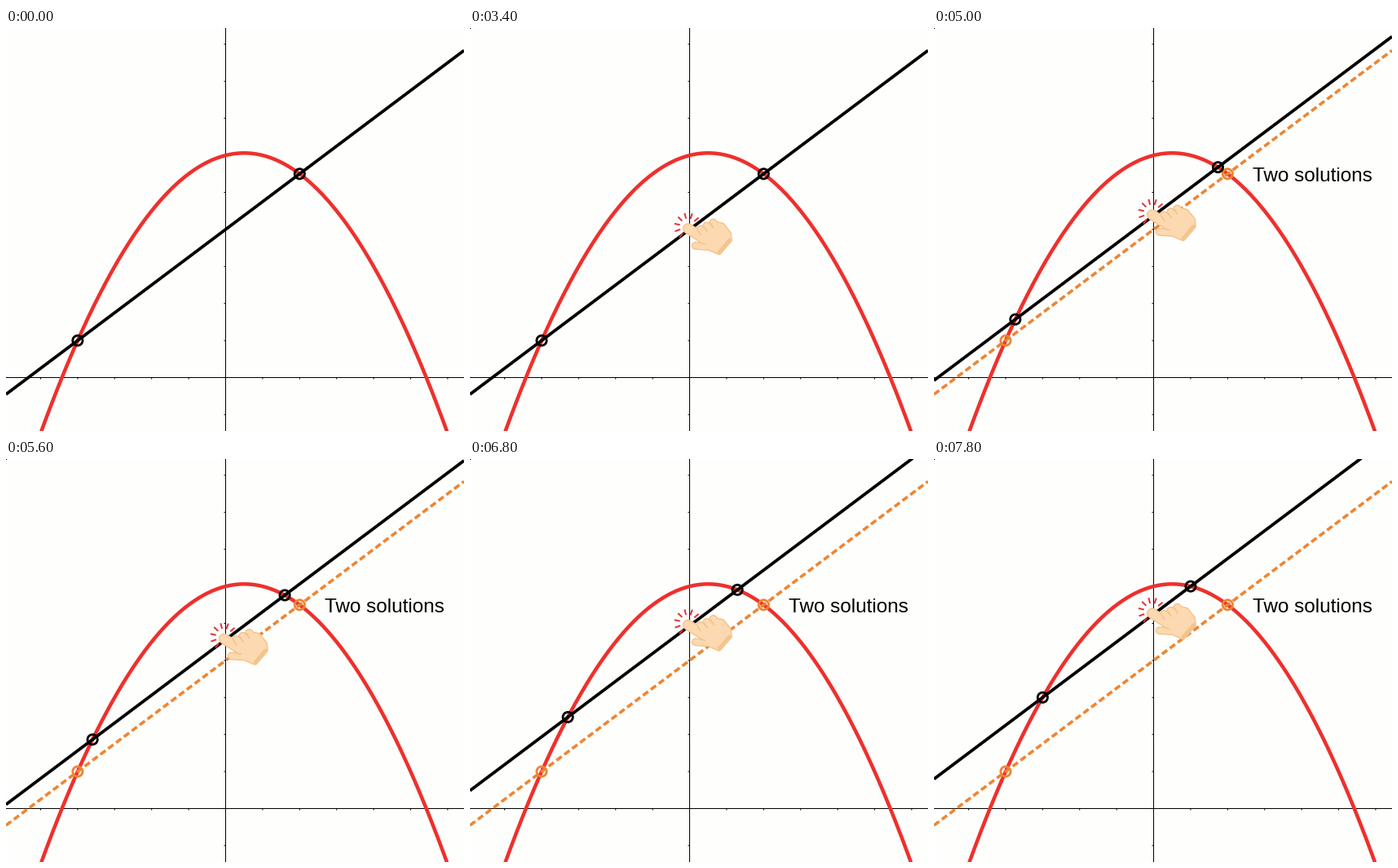
A matplotlib script that plays this animation: 562x494 px, repeating every 8 s.

```python
import math

import numpy as np
import matplotlib.pyplot as plt
from matplotlib.animation import FuncAnimation
from matplotlib.patches import Circle
from matplotlib.transforms import Affine2D

W, H, DPI = 562, 494, 64
PX = 72 / DPI               # points per pixel
STEP, FRAMES = 200, 40      # ms per frame, frames per loop
OX, OY, UNIT = 269.5, 428.5, 45.4
SLOPE, START = 0.75, 4.0

BLACK, RED, ORANGE = "#000000", "#ee302c", "#ee8532"
SKIN, SKIN_EDGE, SPARK = "#fcd9b0", "#f3c48c", "#e0353a"

fig = plt.figure(figsize=(W / DPI, H / DPI), dpi=DPI, facecolor="#fefefd")
ax = fig.add_axes([0, 0, 1, 1])
ax.set_xlim(0, W)
ax.set_ylim(H, 0)
ax.axis("off")


def to_px(x, y):
    return OX + UNIT * np.asarray(x), OY - UNIT * np.asarray(y)


def parabola(x):
    return 6 + 0.25 * x - 0.25 * x * x


def line_points(c):
    """The straight line from the left to the right edge of the stage."""
    x = (np.array([0, W]) - OX) / UNIT
    return to_px(x, SLOPE * x + c)


def crossings(c):
    root = math.sqrt(1 + 4 * (6 - c))
    return [to_px(x, parabola(x)) for x in (-1 - root, -1 + root)]


def stroke(x, y, color, width, z, cap="butt", **kw):
    return ax.plot(x, y, color=color, lw=width * PX, zorder=z, snap=False,
                   solid_capstyle=cap, **kw)[0]


def ring(color, z, center=(0, 0)):
    patch = Circle(center, 6.1, fill=False, ec=color, lw=2.8 * PX, zorder=z)
    return ax.add_patch(patch)


# Coordinate axes with ticks on the left and below
stroke([OX, OX], [0, H], BLACK, 1, 1)
stroke([0, W], [OY, OY], BLACK, 1, 1)
for k in range(-5, 10):
    x, y = to_px(k, k)
    stroke([x, x], [OY, OY + 2], BLACK, 1, 1)
    stroke([OX - 2, OX], [y, y], BLACK, 1, 1)

xs = np.linspace(-5.5, 6.5, 300)
stroke(*to_px(xs, parabola(xs)), RED, 4.5, 2)

# Starting position of the line, left behind as a trace
trace = [stroke(*line_points(START), ORANGE, 3.6, 3, dashes=(2.2, 1.15))]
trace += [ring(ORANGE, 4, p) for p in crossings(START)]

line = stroke(*line_points(START), BLACK, 3.8, 5)
rings = [ring(BLACK, 6) for _ in range(2)]
label = ax.text(391, 188, "Two solutions", family="Liberation Sans",
                size=24.25 * PX, color=BLACK, va="baseline", zorder=7)
corner = stroke([0, 1], [0.5, 0.5], BLACK, 1, 7)


# Pointing hand, in pixels relative to its fingertip
shift = Affine2D()
hand_space = shift + ax.transData


def hand_stroke(points, color, width, z):
    return stroke(*zip(*points), color, width, z, cap="round",
                  solid_joinstyle="round", transform=hand_space)


def make_hand():
    limbs = [([(0, 0), (22, 14)], 10.5),        # index finger
             ([(9, 21), (22, 22)], 7)]          # thumb
    limbs += [([(15 + 8 * k, 1 - 4 * k), (29 + 4 * k, 14)], 8)
              for k in range(3)]                # folded fingers
    palm = [(33, -6), (42, -4), (50, 6), (51, 14), (38, 29), (22, 22)]
    parts = []
    for color, extra, z in ((SKIN_EDGE, 2.8, 8), (SKIN, 0, 9)):
        for points, width in limbs + [(palm + palm[:1], 4)]:
            parts.append(hand_stroke(points, color, width + extra, z))
    parts += ax.fill(*zip(*palm), color=SKIN, lw=0, zorder=9,
                     transform=hand_space)

    for k in range(3):
        x, y = 11.5 + 8 * k, 1.5 - 4 * k
        parts.append(hand_stroke([(x, y), (x + 4, y + 6)], SKIN_EDGE, 1.6, 10))
    parts.append(hand_stroke([(14, 17), (21, 19)], SKIN_EDGE, 1.6, 10))
    parts.append(hand_stroke(palm[3:5], SKIN_EDGE, 4, 10))

    # Click sparks fan out around the tip
    for a in np.radians(np.arange(40, 233, 32)):
        ray = [(r * math.cos(a), -2.5 - r * math.sin(a)) for r in (10, 17)]
        parts.append(stroke(*zip(*ray), SPARK, 2, 10, transform=hand_space))
    return parts


hand = make_hand()


def ramp(t, t0, length):
    return min(max((t - t0) / length, 0), 1)


def intercept(t):
    """Speed up for 0.8 s, then rise steadily."""
    s = max(t - 3.4, 0)
    speed, ease = 0.3125, 0.8
    if s < ease:
        return START + speed * s * s / (2 * ease)
    return START + speed * (s - ease / 2)


def update(i):
    t = i * STEP / 1000
    c = intercept(t)
    line.set_data(*line_points(c))
    for r, p in zip(rings, crossings(c)):
        r.center = p
    shift.clear().translate(267.5, OY - UNIT * c - 1)
    for part in hand:
        part.set_alpha(ramp(t, 2.0, 0.6))
    for part in trace:
        part.set_visible(t > 3.5)
    label.set_alpha(ramp(t, 3.4, 0.5))
    corner.set_visible(i > 0)
    return []


anim = FuncAnimation(fig, update, frames=FRAMES, interval=STEP,
                     repeat=True, repeat_delay=0, blit=False)
plt.show()
```
